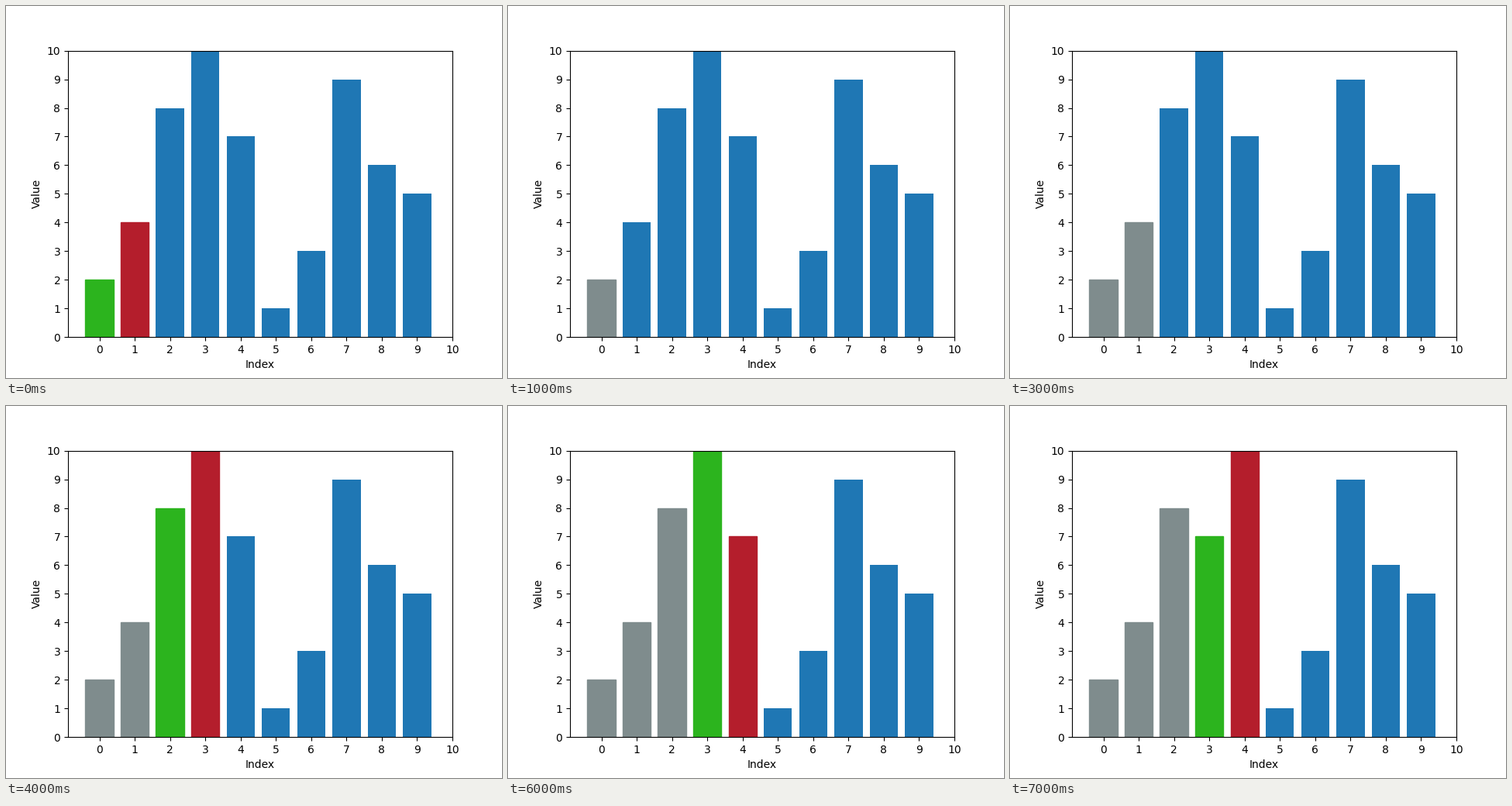
Write a matplotlib script that moves like this. It is 640 by 480 pixels and loops after 8000 ms.

```python
import matplotlib.pyplot as plt
from matplotlib.animation import FuncAnimation

VALUES = [2, 4, 8, 10, 7, 1, 3, 9, 6, 5]
BLUE, GREEN, RED, GREY = "#1f77b4", "#2cb41e", "#b41e2c", "#7f8c8d"
STEPS = 8


def sort_states():
    """First pass of a bubble sort as a list of (values, colors)."""
    values = VALUES[:]
    states = []

    def record(done, pair=()):
        colors = [GREY] * done + [BLUE] * (len(values) - done)
        for i, color in zip(pair, (GREEN, RED)):
            colors[i] = color
        states.append((values[:], colors))

    for i in range(len(values) - 1):
        pair = (i, i + 1)
        record(i, pair)
        if values[i] > values[i + 1]:
            values[i], values[i + 1] = values[i + 1], values[i]
            record(i, pair)
        record(i + 1)
    return states[:STEPS]


states = sort_states()

fig, ax = plt.subplots(figsize=(6.4, 4.8), dpi=100)
bars = ax.bar(range(len(VALUES)), VALUES, color=BLUE)
ax.set_xlim(-0.89, 10)
ax.set_ylim(0, 10)
ax.set_xticks(range(11))
ax.set_yticks(range(11))
ax.set_xlabel("Index")
ax.set_ylabel("Value")


def draw(step):
    for bar, value, color in zip(bars, *states[step]):
        bar.set_height(value)
        bar.set_facecolor(color)
        # only highlighted and finished bars carry an outline
        bar.set_edgecolor("none" if color == BLUE else color)
    return bars


anim = FuncAnimation(fig, draw, frames=STEPS, init_func=lambda: draw(0),
                     interval=1000, repeat=True, repeat_delay=0)
plt.show()
```
